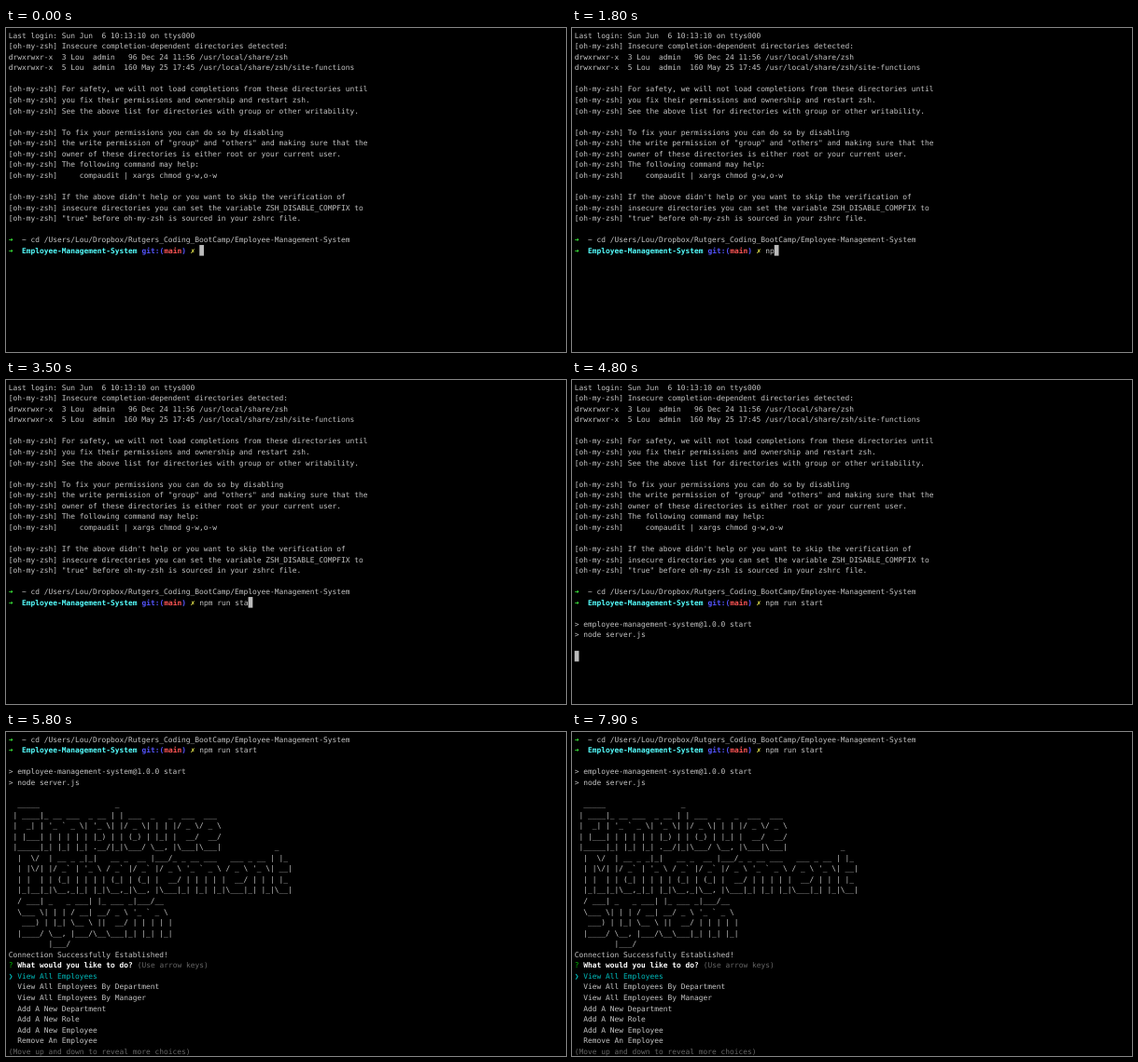
Write an HTML page that moves like this. It is 600x348 px and loops after 8000 ms.

```html
<!DOCTYPE html>
<html lang="en">
<head>
<meta charset="utf-8">
<title>Terminal session</title>
<style>
  html, body { margin: 0; width: 100%; height: 100%; overflow: hidden; background: #000; }
  svg { display: block; width: 600px; height: 348px; }
  text {
    font: 7.9px "DejaVu Sans Mono", "Liberation Mono", monospace;
    white-space: pre;
    text-rendering: geometricPrecision;
    fill: #c4c4c4;
  }
  .G, .C, .B, .R, .Y, .W { font-weight: bold; }
  .G { fill: #3df23d; }
  .C { fill: #55ffff; }
  .B { fill: #5555ff; }
  .R { fill: #ff5555; }
  .Y { fill: #ffff55; }
  .W { fill: #fff; }
  .g { fill: #00bb00; }
  .c { fill: #00bbbb; }
  .d { fill: #666; }
</style>
</head>
<body>
<svg viewBox="0 0 600 348">
  <rect width="600" height="348" fill="#000"/>
  <g id="screen"><rect id="cursor" fill="#bbb"/></g>
</svg>

<!-- {Xtext} marks a run of text in style X -->
<script type="text/plain" id="log">
Last login: Sun Jun  6 10:13:10 on ttys000
[oh-my-zsh] Insecure completion-dependent directories detected:
drwxrwxr-x  3 Lou  admin   96 Dec 24 11:56 /usr/local/share/zsh
drwxrwxr-x  5 Lou  admin  160 May 25 17:45 /usr/local/share/zsh/site-functions

[oh-my-zsh] For safety, we will not load completions from these directories until
[oh-my-zsh] you fix their permissions and ownership and restart zsh.
[oh-my-zsh] See the above list for directories with group or other writability.

[oh-my-zsh] To fix your permissions you can do so by disabling
[oh-my-zsh] the write permission of "group" and "others" and making sure that the
[oh-my-zsh] owner of these directories is either root or your current user.
[oh-my-zsh] The following command may help:
[oh-my-zsh]     compaudit | xargs chmod g-w,o-w

[oh-my-zsh] If the above didn't help or you want to skip the verification of
[oh-my-zsh] insecure directories you can set the variable ZSH_DISABLE_COMPFIX to
[oh-my-zsh] "true" before oh-my-zsh is sourced in your zshrc file.

{G➜}  ~ cd /Users/Lou/Dropbox/Rutgers_Coding_BootCamp/Employee-Management-System
{G➜}  {CEmployee-Management-System} {Bgit:(}{Rmain}{B)} {Y✗}

> employee-management-system@1.0.0 start
> node server.js

  _____                 _
 | ____|_ __ ___  _ __ | | ___  _   _  ___  ___
 |  _| | '_ ` _ \| '_ \| |/ _ \| | | |/ _ \/ _ \
 | |___| | | | | | |_) | | (_) | |_| |  __/  __/
 |_____|_| |_| |_| .__/|_|\___/ \__, |\___|\___|            _
  |  \/  | __ _ _|_|   __ _  __ |___/_ _ __ ___   ___ _ __ | |_
  | |\/| |/ _` | '_ \ / _` |/ _` |/ _ \ '_ ` _ \ / _ \ '_ \| __|
  | |  | | (_| | | | | (_| | (_| |  __/ | | | | |  __/ | | | |_
  |_|__|_|\__,_|_| |_|\__,_|\__, |\___|_| |_| |_|\___|_| |_|\__|
  / ___| _   _ ___| |_ ___ _|___/__
  \___ \| | | / __| __/ _ \ '_ ` _ \
   ___) | |_| \__ \ ||  __/ | | | | |
  |____/ \__, |___/\__\___|_| |_| |_|
         |___/
Connection Successfully Established!
{g?} {WWhat would you like to do?} {d(Use arrow keys)}
{c❯} {cView All Employees}
  View All Employees By Department
  View All Employees By Manager
  Add A New Department
  Add A New Role
  Add A New Employee
  Remove An Employee
{d(Move up and down to reveal more choices)}
</script>

<script>
const LOOP = 8000;
const CELL = 4.757, LINE = 11.553, LEFT = 2.7, TOP = 2, BASELINE = 8.7;
const PROMPT_ROW = 20, PROMPT_COL = 43;
const COMMAND = "npm run start";
const KEY_TIMES = [1500, 1700, 1900, 2100, 2300, 2500, 2700, 2900, 3100, 3300, 3500, 3600, 3700];
const ENTER = 4300, LAUNCH = 4600, MENU = 4900;

const screen = document.getElementById("screen");
const cursor = document.getElementById("cursor");
const colX = col => LEFT + col * CELL;
const rowY = row => TOP + row * LINE;

function addText(parent, row, col, content, style) {
  const el = document.createElementNS("http://www.w3.org/2000/svg", "text");
  el.setAttribute("x", colX(col));
  el.setAttribute("y", rowY(row) + BASELINE);
  if (style) el.setAttribute("class", style);
  el.textContent = content;
  parent.appendChild(el);
  return el;
}

function addRow(line, row) {
  const group = document.createElementNS("http://www.w3.org/2000/svg", "g");
  let col = 0;
  for (const run of line.match(/\{[^}]*\}|[^{]+/g) || []) {
    const styled = run[0] === "{";
    const content = styled ? run.slice(2, -1) : run;
    // anchor at the first visible character
    const indent = content.length - content.trimStart().length;
    if (content.trim()) addText(group, row, col + indent, content.trim(), styled ? run[1] : "");
    col += content.length;
  }
  screen.appendChild(group);
  return group;
}

const lines = document.getElementById("log").textContent.replace(/^\n|\n$/g, "").split("\n");
const rows = lines.map(addRow);
const command = addText(screen, PROMPT_ROW, PROMPT_COL, "");
cursor.setAttribute("width", CELL);
cursor.setAttribute("height", LINE);

function cursorCell(t, typed) {
  if (t < ENTER) return [PROMPT_ROW, PROMPT_COL + typed];
  return [t < LAUNCH ? PROMPT_ROW + 1 : PROMPT_ROW + 5, 0];
}

function render(t) {
  const typed = KEY_TIMES.filter(time => t >= time).length;
  const shown = t < LAUNCH ? 21 : t < MENU ? 24 : rows.length;
  const scroll = t < MENU ? 0 : 19;
  const [row, col] = cursorCell(t, typed);

  command.textContent = COMMAND.slice(0, typed);
  rows.forEach((el, i) => {
    el.style.display = i >= scroll && i < shown ? "" : "none";
  });
  screen.setAttribute("transform", `translate(0 ${-scroll * LINE})`);
  cursor.setAttribute("x", colX(col));
  cursor.setAttribute("y", rowY(row));
  cursor.style.display = t < MENU ? "" : "none";
}

const start = performance.now();
function tick() {
  render((performance.now() - start) % LOOP);
  requestAnimationFrame(tick);
}
tick();
</script>
</body>
</html>
```
